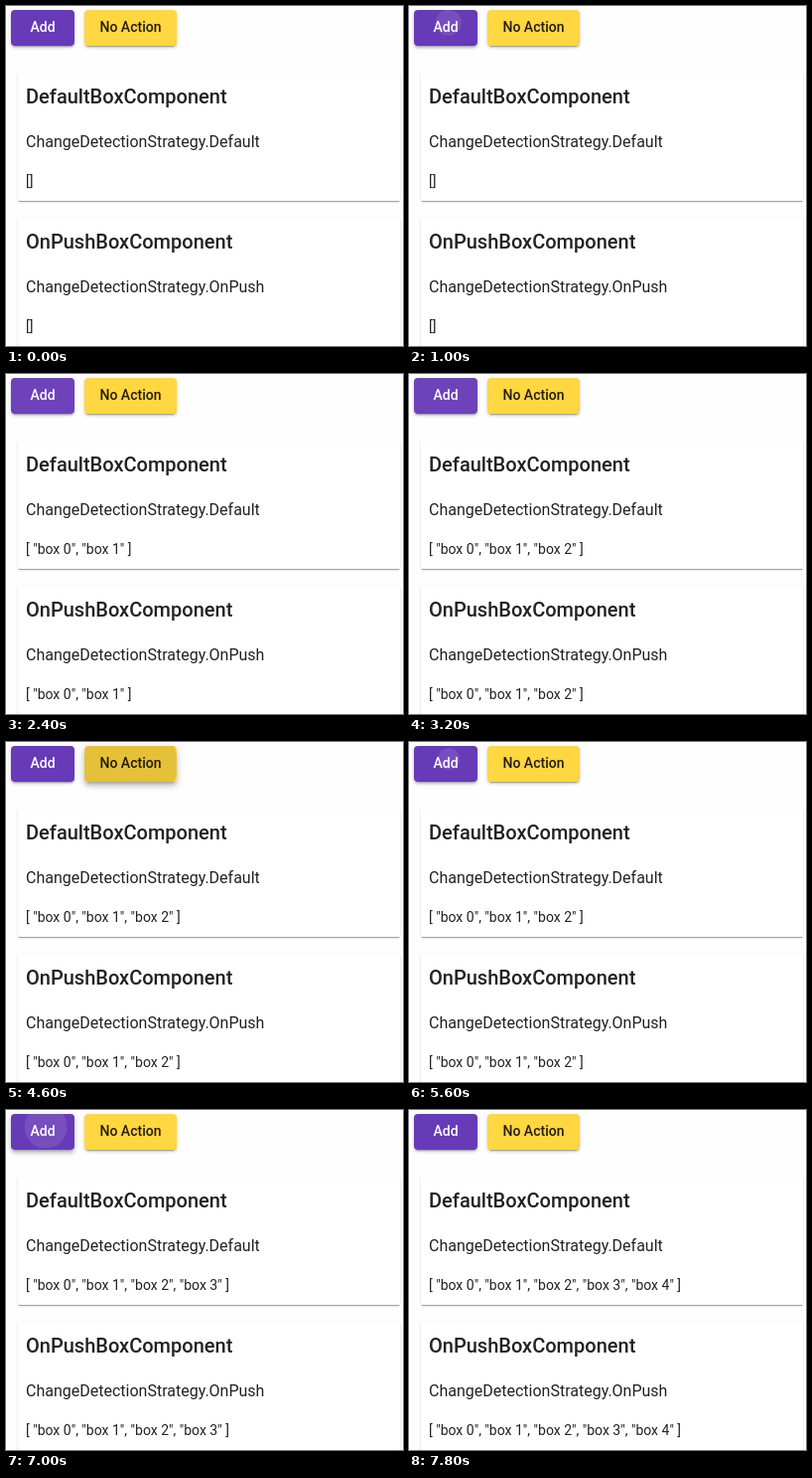
An HTML page for the animation above (8000 ms loop, 400 by 342 pixels).

```html
<!DOCTYPE html>
<html lang="en">
<head>
<meta charset="utf-8">
<title>Change detection boxes</title>
<style>
  html, body { margin: 0; width: 100%; height: 100%; overflow: hidden; background: #fefefe; }
  body { position: relative; font: 14px/20px Roboto, sans-serif; color: rgba(0, 0, 0, .87); }
  .button, .card, .card > *, .ripple { position: absolute; white-space: pre; }
  .button { top: 4px; height: 36px; border-radius: 4px; font-weight: 500; line-height: 35px; text-align: center; }
  .clip { position: absolute; inset: 0; overflow: hidden; border-radius: 4px; }
  .ripple { border-radius: 50%; transform: translate(-50%, -50%); }
  #add { left: 5px; width: 64px; background: #673ab7; color: #fff; }
  #add .ripple { background: #fff; }
  #idle { left: 79px; width: 93px; background: #ffd740; }
  #idle .ripple { background: #000; }
  .card {
    left: 12px; width: 385px; height: 129px; border-radius: 1px; background: #fff;
    box-shadow: 0 2px 1px -1px rgba(0, 0, 0, .2), 0 1px 1px rgba(0, 0, 0, .14), 0 1px 3px rgba(0, 0, 0, .12);
  }
  .card > * { left: 8px; margin: 0; }
  h1 { top: 14px; font-size: 20px; font-weight: 500; line-height: 20px; }
  p { top: 59px; font-size: 16px; line-height: 21px; }
  .list { top: 99px; }
</style>
</head>
<body>
<div class="button" id="add">Add<div class="clip"><div class="ripple"></div></div></div>
<div class="button" id="idle">No Action<div class="clip"><div class="ripple"></div></div></div>
<div class="card" style="top:67px">
  <h1>DefaultBoxComponent</h1><p>ChangeDetectionStrategy.Default</p><div class="list"></div>
</div>
<div class="card" style="top:213px">
  <h1>OnPushBoxComponent</h1><p>ChangeDetectionStrategy.OnPush</p><div class="list"></div>
</div>
<script>
const LOOP = 8000, STEP = 100;
const HOLD = 150, GROW = 450, FADE = 400, LIFT = 280;
const buttons = [
  { el: document.getElementById('add'), x: 35, y: 13, radius: 42, presses: [950, 1850, 2650, 5560, 6910] },
  { el: document.getElementById('idle'), x: 46, y: 18, radius: 52, presses: [4350] },
];
const lists = document.querySelectorAll('.list');

const clamp = v => Math.min(1, Math.max(0, v));
const easeOut = p => 1 - (1 - clamp(p)) ** 3.2;
const smooth = p => p * p * (3 - 2 * p);

// Layers are [y, blur, spread, alpha], blended from resting to raised.
const resting = [[3, 1, -2, .2], [2, 2, 0, .14], [1, 5, 0, .12]];
const raised = [[5, 5, -3, .2], [8, 10, 1, .14], [3, 14, 2, .12]];
function shadow(lift) {
  return resting.map((layer, i) => {
    const [y, blur, spread, alpha] = layer.map((v, j) => v + (raised[i][j] - v) * lift);
    return `0 ${y}px ${blur}px ${spread}px rgba(0,0,0,${alpha})`;
  }).join();
}

function drawButton({ el, x, y, radius, presses }, time) {
  const start = presses.filter(p => p <= time).pop() ?? -LOOP;
  const age = time - start;
  const peak = smooth(HOLD / LIFT);
  const lift = age < HOLD ? smooth(age / LIFT) : peak * (1 - smooth(clamp((age - HOLD) / LIFT)));
  el.style.boxShadow = shadow(lift);

  const size = 2 * radius * easeOut(age / GROW);
  Object.assign(el.querySelector('.ripple').style, {
    left: x + 'px', top: y + 'px', width: size + 'px', height: size + 'px',
    opacity: .1 * (1 - easeOut((age - GROW) / FADE)),
  });
}

function draw(now) {
  const time = Math.floor(now % LOOP / STEP) * STEP;
  buttons.forEach(button => drawButton(button, time));
  const items = buttons[0].presses.filter(p => p + HOLD <= time).map((_, i) => `"box ${i}"`);
  const text = items.length ? `[ ${items.join(', ')} ]` : '[]';
  lists.forEach(list => list.textContent = text);
}

const begin = performance.now();
function frame() {
  draw(performance.now() - begin);
  requestAnimationFrame(frame);
}
frame();
</script>
</body>
</html>
```
